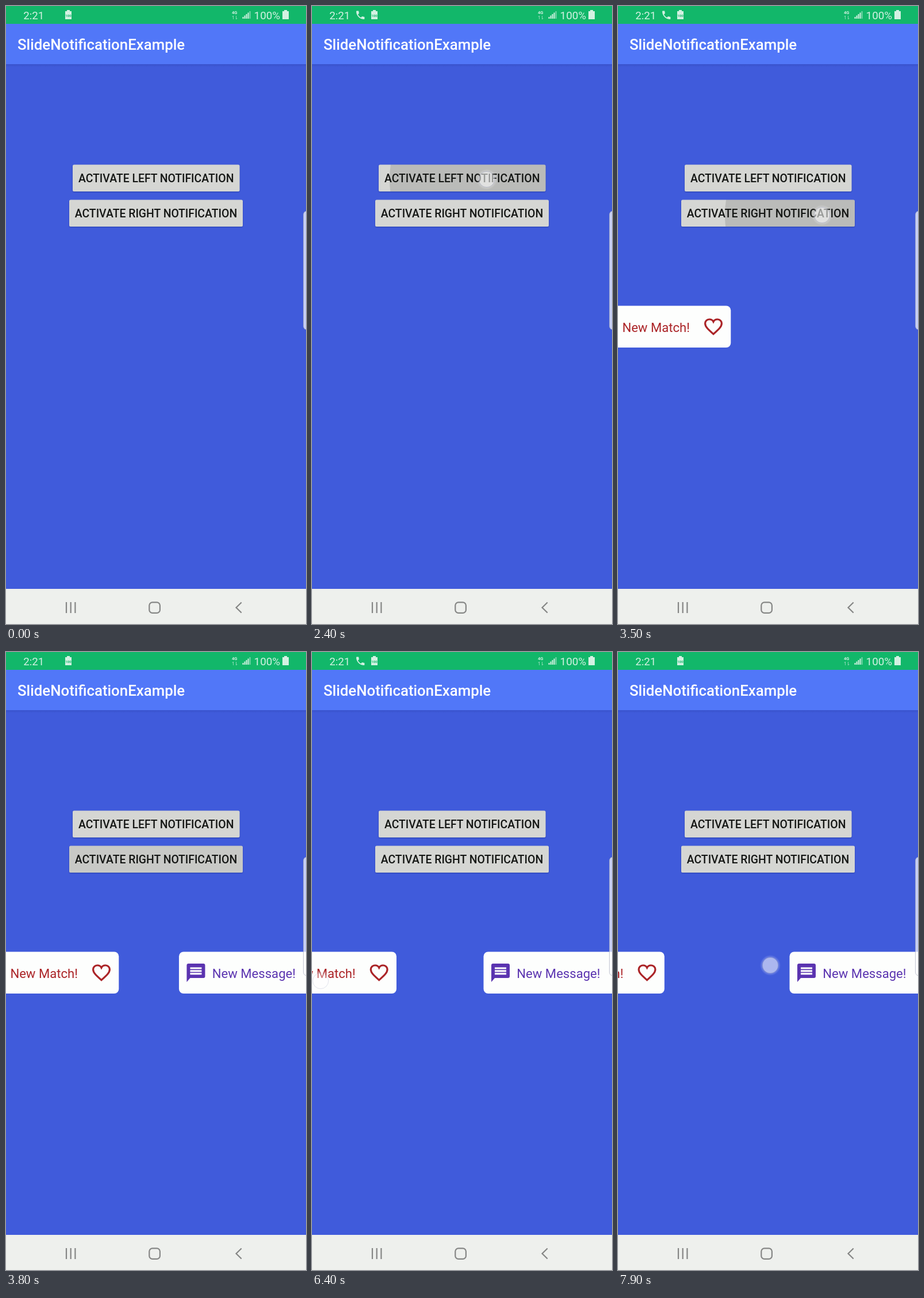
An HTML page that plays this animation: 522 by 1073 pixels, repeating every 8 s.

```html
<!DOCTYPE html>
<html lang="en">
<head>
<meta charset="utf-8">
<title>Slide notifications</title>
<style>
html, body { margin: 0; width: 100%; height: 100%; overflow: hidden; background: #405bdb; }
svg { display: block; width: 522px; height: 1073px; font-family: Roboto, sans-serif; }
.status { fill: #d3f1e2; }
.status text { font-size: 18.8px; }
.status .tiny { font-size: 7.5px; font-weight: 700; }
.status .level { font-size: 6px; font-weight: 700; fill: #12b76a; text-anchor: middle; }
.title { font-size: 25.8px; font-weight: 500; fill: #fff; }
.label { font-size: 19.4px; font-weight: 500; fill: #141614; text-anchor: middle; }
.card text { font-size: 22.1px; }
.nav { fill: none; stroke: #858685; stroke-width: 2.2; }
</style>
</head>
<body>
<svg viewBox="0 0 522 1073">
  <defs>
    <linearGradient id="shade" x2="0" y2="1">
      <stop offset="0" stop-color="#1c2f8c" stop-opacity=".2"/>
      <stop offset="1" stop-color="#1c2f8c" stop-opacity="0"/>
    </linearGradient>
    <radialGradient id="halo">
      <stop offset=".72" stop-color="#fff" stop-opacity=".3"/>
      <stop offset="1" stop-color="#fff" stop-opacity="0"/>
    </radialGradient>
    <filter id="drop" x="-5%" y="-10%" width="110%" height="130%">
      <feDropShadow dx="0" dy="1" stdDeviation="1" flood-color="#101b55" flood-opacity=".35"/>
    </filter>
    <rect id="buttonL" x="116" y="275.5" width="290.5" height="46.5" rx="2.5"/>
    <rect id="buttonR" x="110" y="336.5" width="302" height="46.5" rx="2.5"/>
    <clipPath id="clipL"><use href="#buttonL"/></clipPath>
    <clipPath id="clipR"><use href="#buttonR"/></clipPath>
    <path id="battery" d="M3 0h5v2h3v14h-11v-14h3z"/>
  </defs>

  <rect width="522" height="1073" fill="#405bdb"/>
  <rect y="101" width="522" height="5" fill="url(#shade)"/>
  <rect y="30" width="522" height="71" fill="#5177f8"/>
  <rect width="522" height="31" fill="#12b76a"/>
  <text class="title" x="20" y="76">SlideNotificationExample</text>

  <g class="status">
    <text x="30.2" y="22.5">2:21</text>
    <path id="phone" transform="translate(74.6 6.2) scale(.8)" d="M6.6 10.8c1.4 2.8 3.8 5.1 6.6 6.6l2.2-2.2c.3-.3.7-.4 1-.2 1.1.4 2.3.6 3.6.6q1 0 1 1V20q0 1-1 1C10.600 21 3 13.400 3 4q0-1 1-1h3.500q1 0 1 1c0 1.200.2 2.400.6 3.600q.2.600-.3 1z"/>
    <use href="#battery" x="103" y="7"/>
    <text class="level" x="108.500" y="18.500" style="font-size:6px">100</text>
    <text class="tiny" x="393" y="13.500" style="font-size:7.5px">4G</text>
    <path d="M395.500 23v-6l-1.800 2M400.500 17v6l1.800-2" fill="none" stroke="#d3f1e2" stroke-opacity=".6"/>
    <g id="signal"></g>
    <text x="431.600" y="22.500">100%</text>
    <use href="#battery" x="481" y="7"/>
  </g>

  <g filter="url(#drop)" fill="#d5d6d3">
    <use href="#buttonL"/>
    <use href="#buttonR"/>
  </g>
  <g clip-path="url(#clipL)"><circle id="rippleL" cx="304" cy="301"/></g>
  <g clip-path="url(#clipR)"><circle id="rippleR" cx="355" cy="363"/></g>
  <text class="label" x="261.200" y="306.200">ACTIVATE LEFT NOTIFICATION</text>
  <text class="label" x="261" y="367">ACTIVATE RIGHT NOTIFICATION</text>

  <g id="cardL" class="card" fill="#ab2427">
    <rect x="-60" y="520.500" width="256.300" height="72.500" rx="8" fill="#fdfefd"/>
    <text x="7.400" y="566">New Match!</text>
    <path transform="translate(146.800 537.600) scale(1.6)" fill="none" stroke="#ab2427" stroke-width="2" d="M12 20C6 14.600 3 11.900 3 8.500 3 5.900 5 4 7.500 4 9.400 4 11.200 5 12 6.600 12.800 5 14.600 4 16.500 4 19 4 21 5.900 21 8.500 21 11.900 18 14.600 12 20z"/>
  </g>
  <g id="cardR" class="card" fill="#5b34b0">
    <rect x="298.500" y="520.500" width="290" height="72.500" rx="8" fill="#fdfefd"/>
    <path d="M315 541h26q3 0 3 3v19q0 3-3 3h-23l-6 7v-29q0-3 3-3z"/>
    <path d="M318 549h20m-20 4.800h20m-20 4.800h20" stroke="#fdfefd" stroke-width="3.200"/>
    <text x="356.300" y="566">New Message!</text>
  </g>

  <rect x="517.500" y="356" width="14" height="206" rx="6" fill="#fff" fill-opacity=".7" stroke="#9aa0b4" stroke-opacity=".6"/>

  <rect y="1012" width="522" height="61" fill="#eef0ed"/>
  <g class="nav">
    <path d="M105 1035v19m7.700-19v19m7.700-19v19"/>
    <rect x="249.300" y="1035.300" width="18.600" height="18.600" rx="5.500"/>
    <path d="M409.700 1035.500l-9.200 9 9.200 9"/>
  </g>

  <g id="touch">
    <circle r="18" fill="url(#halo)"/>
    <circle r="13.700" fill="#fff" fill-opacity=".38" stroke="#6f74a0" stroke-opacity=".3"/>
  </g>
</svg>
<script>
const LOOP = 8000, STEP = 100, SLIDE = 300, FADE = 300;
const TAP_L = 2400, TAP_R = 3500, SWIPE = 6000, PULL = 7600;
const $ = id => document.getElementById(id);

const tap = (down, x, y) => ({ down, up: down, from: [x, y], to: [x, y] });
const swipe = (down, from, to) => ({ down, up: down + 300, from, to });
const gestures = [
  tap(TAP_L, 304, 301),
  tap(TAP_R, 355, 363),
  swipe(SWIPE, [140, 562], [15, 571]),
  swipe(PULL, [24, 574], [265, 544])
];

const clamp = p => Math.min(1, Math.max(0, p));
const ease = p => (1 - Math.cos(Math.PI * clamp(p))) / 2;
const slide = (t, start) => ease((t - start) / SLIDE);

function move(id, x, y = 0) {
  $(id).setAttribute('transform', `translate(${x} ${y})`);
}

function ripple(id, age) {
  $(id).setAttribute('r', Math.max(0, 169 + age * 1.5));
  $(id).setAttribute('opacity', age < 0 ? 0 : .125 * clamp((400 - age) / 200));
}

function touch(t) {
  const g = gestures.findLast(g => g.down <= t);
  $('touch').setAttribute('opacity', g ? clamp(1 - (t - g.up) / FADE) : 0);
  if (!g) return;
  const p = g.up > g.down ? ease((t - g.down) / (g.up - g.down)) : 0;
  move('touch', ...g.from.map((v, i) => v + (g.to[i] - v) * p));
}

function draw(t) {
  // the call icon blinks once a second
  const ringing = t >= 100 && (t - 100) % 1000 < 500;
  $('phone').setAttribute('visibility', ringing ? 'visible' : 'hidden');

  ripple('rippleL', t - TAP_L);
  ripple('rippleR', t - TAP_R);

  // the left card slides in, later folds back to its icon
  move('cardL', -196.5 * (1 - slide(t, TAP_L + 20)) - 115.5 * slide(t, SWIPE + 264));
  move('cardR', 224 * (1 - slide(t, TAP_R + 20)));
  touch(t);
}

for (let i = 0; i < 5; i++) {
  const bar = document.createElementNS('http://www.w3.org/2000/svg', 'rect');
  const h = 3 + i * 2.5;
  const box = { x: 411.5 + i * 3, y: 22 - h, width: 2, height: h, opacity: i < 4 ? 1 : .55 };
  for (const k in box) bar.setAttribute(k, box[k]);
  $('signal').append(bar);
}

const begin = performance.now();
function tick() {
  const t = (performance.now() - begin) % LOOP;
  draw(Math.floor(t / STEP) * STEP);
  requestAnimationFrame(tick);
}
tick();
</script>
</body>
</html>
```
